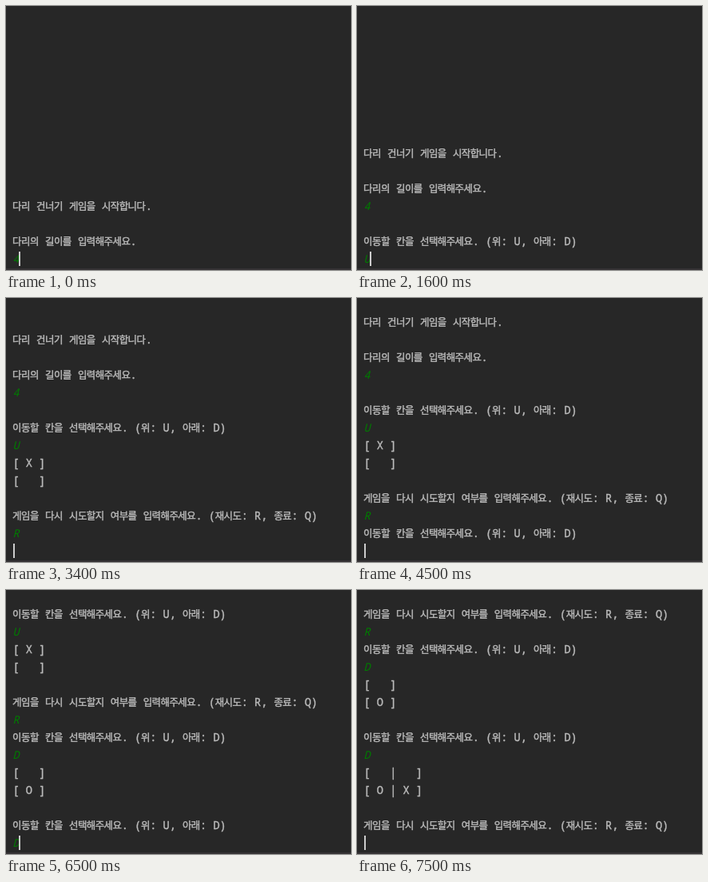
An HTML page with a canvas for the animation above (8000 ms loop, 432x330 px).

```html
<!DOCTYPE html>
<html lang="ko">
<head>
<meta charset="utf-8">
<title>다리 건너기</title>
<style>
  html, body { margin: 0; width: 100%; height: 100%; overflow: hidden; background: #272727; }
  canvas { display: block; }
</style>
</head>
<body>
<canvas width="432" height="330"></canvas>
<script>
const ctx = document.querySelector('canvas').getContext('2d');

const MOVE = '이동할 칸을 선택해주세요. (위: U, 아래: D)';
const RETRY = '게임을 다시 시도할지 여부를 입력해주세요. (재시도: R, 종료: Q)';
const lines = [
  '다리 건너기 게임을 시작합니다.', '', '다리의 길이를 입력해주세요.', '4', '',
  MOVE, 'U', '[ X ]', '[   ]', '',
  RETRY, 'R',
  MOVE, 'D', '[   ]', '[ O ]', '',
  MOVE, 'D', '[   |   ]', '[ O | X ]', '',
  RETRY, ''
];

// [start ms, index of the bottom row, state of that row]
const WAIT = 0, BLINK = 1, TYPED = 2;
const steps = [
  [0, 3, TYPED], [100, 4, WAIT],
  [400, 6, WAIT], [1100, 6, BLINK], [1600, 6, TYPED], [1800, 7, WAIT],
  [2500, 11, WAIT], [3200, 11, BLINK], [3300, 11, TYPED], [3400, 12, WAIT], [4200, 12, BLINK],
  [4500, 13, WAIT], [5000, 13, TYPED], [5100, 14, WAIT],
  [5500, 18, WAIT], [6200, 18, BLINK], [6500, 18, TYPED], [6700, 19, WAIT], [7200, 19, BLINK],
  [7500, 23, WAIT]
];

const LOOP = 8000, LEFT = 8.4, ROW = 22, BOTTOM = 316, BASELINE = 5;
const LATIN = { font: '13.67px "Noto Sans Mono", monospace', advance: 8.2 };
const HANGUL = {
  font: '12.5px "Noto Sans CJK KR", "Noto Sans CJK JP", "Noto Sans CJK", sans-serif',
  advance: 10.9
};

function drawLine(text, y) {
  const isInput = /^\w$/.test(text);
  ctx.fillStyle = ctx.strokeStyle = isInput ? '#007a00' : '#bbb';
  ctx.lineWidth = 0.4;
  ctx.textAlign = 'center';
  let x = LEFT;
  for (const char of text) {
    const { font, advance } = /[가-힣]/.test(char) ? HANGUL : LATIN;
    const center = x + advance / 2;
    ctx.font = (isInput ? 'italic 300 ' : '500 ') + font;
    ctx.fillText(char, center, y + BASELINE);
    if (!isInput) ctx.strokeText(char, center, y + BASELINE);
    x += advance;
  }
}

function draw(time) {
  const [, bottom, state] = steps.findLast(([start]) => start <= time);
  ctx.fillStyle = '#272727';
  ctx.fillRect(0, 0, 432, 330);

  const last = state === TYPED ? bottom : bottom - 1;
  for (let i = Math.max(0, bottom - 14); i <= last; i++) {
    drawLine(lines[i], BOTTOM - (bottom - i) * ROW);
  }
  if (state !== BLINK) {
    ctx.fillStyle = '#ccc';
    ctx.fillRect(state === TYPED ? 16 : 9, 307, 2, 18);
  }
  ctx.fillStyle = '#363335';
  ctx.fillRect(0, 328, 432, 2);
}

const begin = performance.now();
function tick() {
  draw((performance.now() - begin) % LOOP);
  requestAnimationFrame(tick);
}
tick();
</script>
</body>
</html>
```
